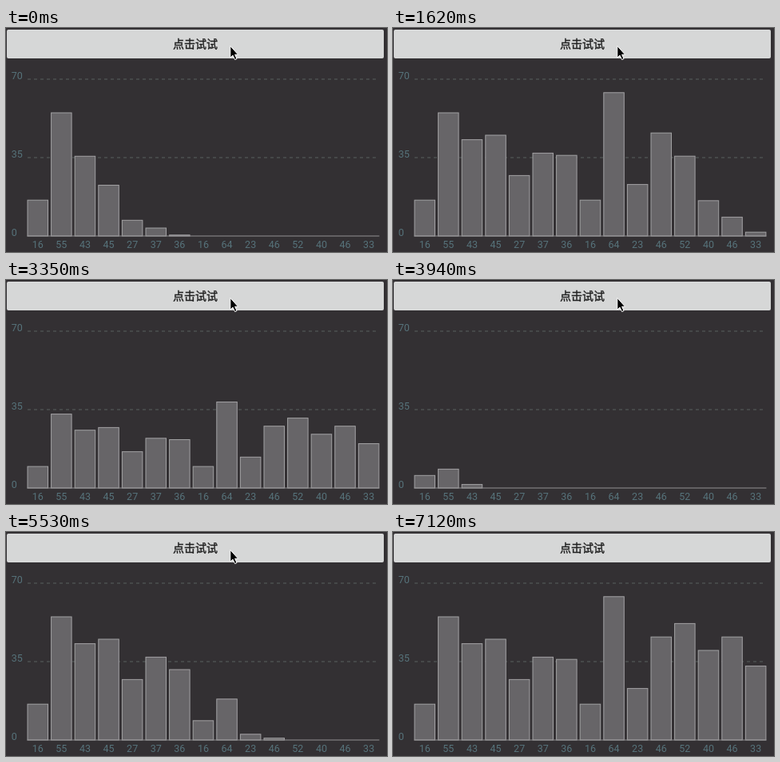
An HTML page for the animation above (7.55 s loop, 477 by 280 pixels).

```html
<!DOCTYPE html>
<html lang="zh">
<head>
<meta charset="utf-8">
<style>
  html, body { margin: 0; height: 100%; overflow: hidden; background: #333033; }
  svg { display: block; }
  .label { font: 12.5px Roboto, sans-serif; fill: #56727a; }
  .caption { font: 14px "Noto Sans CJK SC", "Noto Sans CJK", sans-serif; fill: #202020; stroke: #202020; stroke-width: .4; }
  .bar { fill: #676568; stroke: #a2a1a3; }
  .grid { stroke: #59605f; stroke-dasharray: 4 4; }
</style>
</head>
<body>
<svg id="stage" width="477" height="280" viewBox="0 0 477 280">
  <rect x="1" y="2" width="472" height="36" rx="2" fill="#d6d7d7"/>
  <text class="caption" x="237" y="25" text-anchor="middle">点击试试</text>
  <path class="grid" d="M27 64H467M27 162H467"/>
  <text class="label" x="6.7" y="64.4">70</text>
  <text class="label" x="6.7" y="162.4">35</text>
  <text class="label" x="6.7" y="260.4">0</text>
  <g id="chart"></g>
  <path d="M26.5 260H467.4" stroke="#929193"/>
  <path id="cursor" d="M.8 .4V15L4 12.2L6.6 17.6L9 16.5L6.6 11.3H10.6Z" stroke="#fff"/>
</svg>
<script>
const LOOP = 7550, STEP = 135, STEP_LEAD = 50;
const BASE = 260, UNIT = 2.8, PITCH = 29.6, STAGGER = .2;
const FALL_START = 3285, FALL_END = 3510;
const values = [16, 55, 43, 45, 27, 37, 36, 16, 64, 23, 46, 52, 40, 46, 33];

// Key points: [time, progress] and [time, x, y].
const regrowth = [[3300, 0], [4995, 1.63], [6210, 2.765], [7155, 3.85]];
const cursorPath = [[5940, 280, 22], [6210, 366, 102], [6750, 490, 318]];

const stage = document.getElementById("stage");
const chart = document.getElementById("chart");
const cursor = document.getElementById("cursor");

const clamp = x => Math.min(1, Math.max(0, x));

function sample(keys, t, column = 1) {
  const next = Math.max(1, keys.findIndex(key => key[0] > t));
  if (t >= keys[keys.length - 1][0]) return keys[keys.length - 1][column];
  const a = keys[next - 1], b = keys[next];
  return a[column] + (b[column] - a[column]) * clamp((t - a[0]) / (b[0] - a[0]));
}

function add(tag, attributes) {
  const node = document.createElementNS(stage.namespaceURI, tag);
  for (const name in attributes) node.setAttribute(name, attributes[name]);
  return chart.appendChild(node);
}

const bars = values.map((value, i) => {
  const x = 27 + PITCH * i;
  add("text", { class: "label", x: x + 12.75, y: 275.4, "text-anchor": "middle" }).textContent = value;
  return add("rect", { class: "bar", x, width: 25.5 });
});

// Bars accelerate one after another; between the two runs they all drop together.
function growth(i, t) {
  if (t >= FALL_START && t < FALL_END) return (FALL_END - t) / (FALL_END - FALL_START);
  const progress = t < FALL_START ? 1.31 + t / 943 : sample(regrowth, t);
  return clamp(progress - i * STAGGER) ** 2;
}

function draw(t) {
  bars.forEach((bar, i) => {
    const height = values[i] * UNIT * growth(i, t);
    bar.setAttribute("y", BASE - height);
    bar.setAttribute("height", height);
    bar.setAttribute("visibility", height > .3 ? "visible" : "hidden");
  });
  cursor.setAttribute("transform", `translate(${sample(cursorPath, t)} ${sample(cursorPath, t, 2)})`);
}

const start = performance.now();
function frame() {
  const t = (performance.now() - start) % LOOP;
  draw(STEP * Math.floor((t + STEP_LEAD) / STEP));
  requestAnimationFrame(frame);
}
frame();
</script>
</body>
</html>
```
